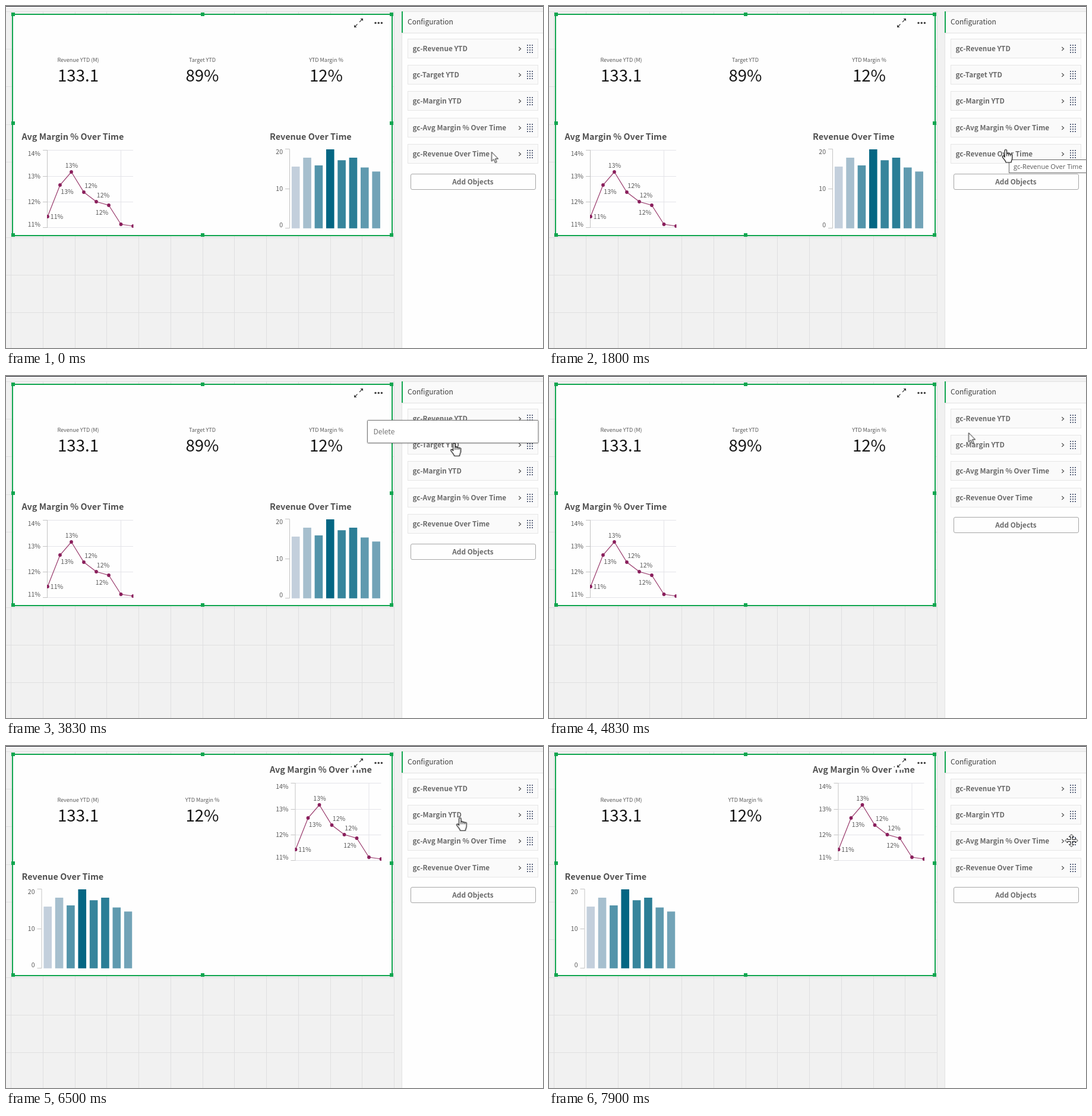
An HTML page for the animation above (8000 ms loop, 904 by 575 pixels).

```html
<!DOCTYPE html>
<html lang="en">
<head>
<meta charset="utf-8">
<title>Dashboard configuration</title>
<style>
html, body { margin: 0; width: 100%; height: 100%; overflow: hidden; background: #f1f1f1; }
svg { display: block; width: 100vw; height: 100vh; }
text { font-family: "Noto Sans CJK JP", "Noto Sans CJK SC", "Noto Sans CJK KR", "Open Sans", sans-serif; fill: #595959; }
.mid { text-anchor: middle; }
.end { text-anchor: end; }
.label { font-size: 9.05px; }
.value { font-size: 27.6px; fill: #151515; }
.title { font-size: 14.45px; font-weight: 600; fill: #505050; }
.axis { font-size: 10.5px; }
.head { font-size: 12px; fill: #404040; }
.item { font-size: 11.82px; font-weight: 600; fill: #6a6a6a; }
.tip { font: 11.1px "Open Sans", "Noto Sans", sans-serif; }
.grid { stroke: #dfdfe0; }
.rule { stroke: #e4e4e9; }
.tick { stroke: #c4c4c4; }
.cur { fill: #fff; stroke: #111; stroke-linejoin: round; }

.anim, #cursor, #tooltip { animation: 8s infinite step-end; }
#listA { animation-name: listA; }
#listB { animation-name: listB; }
#menu { animation-name: menu; }
#hover { animation-name: hover; }
#kpiA { animation-name: kpiA; }
#kpiB, #mask { animation-name: kpiB; }
#line { animation-name: line; }
#bars { animation-name: bars; }
#arrow { animation-name: arrow; }
#hand { animation-name: hand; }
#move { animation-name: move; }
#tooltip { animation-name: tooltip; animation-timing-function: linear; }
#cursor { animation-name: path; animation-timing-function: linear; }

@keyframes listA { 0% { visibility: visible } 59.65%, 100% { visibility: hidden } }
@keyframes listB { 0% { visibility: hidden } 59.65%, 100% { visibility: visible } }
@keyframes menu { 0% { visibility: hidden } 47.8% { visibility: visible } 59.05%, 100% { visibility: hidden } }
@keyframes hover { 0% { fill: #fff } 52.3% { fill: #f0f0f0 } 59.05%, 100% { fill: #fff } }
@keyframes kpiA { 0% { visibility: visible } 73.7%, 100% { visibility: hidden } }
@keyframes kpiB { 0% { visibility: hidden } 73.7%, 100% { visibility: visible } }
@keyframes line { 0% { transform: none } 73.7%, 100% { transform: translate(417.5px, -180px) } }
@keyframes bars {
  0% { transform: none; visibility: visible }
  60.3% { transform: none; visibility: hidden }
  73.7%, 100% { transform: translate(-417.5px, 0); visibility: visible }
}
@keyframes tooltip { 0%, 20% { opacity: 0 } 22.4%, 32% { opacity: 1 } 32.4%, 100% { opacity: 0 } }
@keyframes arrow {
  0% { opacity: 1 } 4.1% { opacity: 0 }
  32.5% { opacity: 1 } 33% { opacity: 0 }
  34.5% { opacity: 1 } 35.1% { opacity: 0 }
  36.6% { opacity: 1 } 37.1% { opacity: 0 }
  52.3% { opacity: 1 } 77% { opacity: 0 }
  94.6% { opacity: 1 } 96.5%, 100% { opacity: 0 }
}
@keyframes hand {
  0% { opacity: 0 } 4.1% { opacity: 1 }
  32.5% { opacity: 0 } 33% { opacity: 1 }
  34.5% { opacity: 0 } 35.1% { opacity: 1 }
  36.6% { opacity: 0 } 37.1% { opacity: 1 }
  52.3% { opacity: 0 } 77% { opacity: 1 }
  85.4%, 100% { opacity: 0 }
}
@keyframes move {
  0% { opacity: 0 } 85.4% { opacity: 1 }
  94.6% { opacity: 0 } 96.5%, 100% { opacity: 1 }
}
@keyframes path {
  0%, 4.1% { transform: translate(817.5px, 245.5px) }
  7.8%, 15.3% { transform: translate(809.5px, 243px); animation-timing-function: ease-in-out }
  19.8%, 32% { transform: translate(769px, 241.5px) }
  37.4% { transform: translate(780.5px, 125.5px); animation-timing-function: ease-out }
  41.2%, 52% { transform: translate(754.5px, 113px); animation-timing-function: ease-out }
  54.9%, 76.25% { transform: translate(706.5px, 95.5px) }
  81.2% { transform: translate(762px, 120.5px) }
  83.7% { transform: translate(858px, 128px); animation-timing-function: ease-out }
  87.4%, 92.4% { transform: translate(881.5px, 118.5px) }
  98.7%, 100% { transform: translate(879.5px, 159px) }
}
</style>
</head>
<body>
<svg viewBox="0 0 904 575" preserveAspectRatio="none">
  <defs>
    <clipPath id="plot"><rect x="69" y="236" width="145.5" height="140"/></clipPath>
    <filter id="shadow" x="-5%" y="-30%" width="110%" height="160%">
      <feDropShadow dx="0" dy="0.5" stdDeviation="1.3" flood-opacity=".25"/>
    </filter>
  </defs>
  <rect width="904" height="575" fill="#f1f1f1"/>
  <g id="sheet" class="grid"></g>

  <rect x="11" y="14" width="639" height="372" fill="#fefefe" stroke="#12a650" stroke-width="2"/>
  <g id="handles" fill="#12a650"></g>

  <g id="kpi"></g>
  <g id="kpiA" class="anim"></g>
  <g id="kpiB" class="anim"></g>
  <g id="line" class="anim"></g>
  <g id="bars" class="anim"></g>

  <rect id="mask" class="anim" x="582" y="18" width="16" height="22" fill="#fefefe"/>
  <g fill="#404040" stroke="#404040">
    <path d="M595 27L599.5 22.5M587 35L591.5 30.5" stroke-width="1.2"/>
    <path d="M596.5 21H601V25.5ZM586 31.5V36H590.5Z" stroke="none"/>
    <g stroke="none"><circle cx="622" cy="28.5" r="1.7"/><circle cx="627.2" cy="28.5" r="1.7"/><circle cx="632.4" cy="28.5" r="1.7"/></g>
  </g>

  <rect x="666" y="9" width="238" height="566" fill="#fefefe"/>
  <path d="M666 9.5H904M666.5 9V575" stroke="#e2e2e2"/>
  <rect x="667" y="10" width="237" height="35" fill="#fafafa"/>
  <path d="M667 45.5H904" stroke="#e2e2e2"/>
  <rect x="666" y="9" width="2" height="36" fill="#12a650"/>
  <text class="head" x="676" y="31">Configuration</text>
  <g id="listA" class="anim"></g>
  <g id="listB" class="anim"></g>
  <rect width="904" height="1" fill="#1c1c22"/>

  <g id="menu" class="anim">
    <rect id="hover" class="anim" x="608.5" y="74.5" width="287.5" height="38" rx="1" stroke="#777" filter="url(#shadow)"/>
    <text class="head" x="618.5" y="98" style="fill:#737373">Delete</text>
  </g>
  <g id="tooltip">
    <rect x="774.5" y="258.5" width="135" height="22" fill="#fff" stroke="#666"/>
    <text class="tip" x="782" y="274">gc-Revenue Over Time</text>
  </g>

  <g id="cursor">
    <path id="arrow" class="anim cur" d="M0 0V15.5L3.6 12.2L6.1 18L8.6 16.9L6.1 11.3H11Z"/>
    <g id="hand" class="anim">
      <path class="cur" stroke-width="1.2" d="M-1.8 12.5V1.7a1.7 1.7 0 0 1 3.4 0V7.5a1.6 1.6 0 0 1 3.2 .6a1.6 1.6 0 0 1 3.1 .7a1.5 1.5 0 0 1 2.9 .9V14.5c0 2.5-1.6 4-1.8 7H.2c-.3-2.6-3-5-5.6-8.6c-1.2-1.9 .9-3.3 2.3-1.9Z"/>
      <path d="M1.6 7.5V11M4.8 8.2V11M7.9 9V11" stroke="#111"/>
    </g>
    <path id="move" class="anim cur" d="M0-10.5L4-6.5H1.5V-1.5H6.5V-4L10.5 0L6.5 4V1.5H1.5V6.5H4L0 10.5L-4 6.5H-1.5V1.5H-6.5V4L-10.5 0L-6.5-4V-1.5H-1.5V-6.5H-4Z"/>
  </g>
</svg>
<script>
const fill = (id, parts) => { document.getElementById(id).innerHTML = parts.flat(9).join(''); };
const text = (cls, x, y, s) => `<text class="${cls}" x="${x}" y="${y}">${s}</text>`;
const path = (cls, d) => `<path class="${cls}" d="${d}" fill="none"/>`;
const rect = (x, y, w, h, attrs = '') => `<rect x="${x}" y="${y}" width="${w}" height="${h}" ${attrs}/>`;
const range = n => [...Array(n).keys()];

fill('sheet', [
  range(13).map(i => path('grid', `M${Math.round(8 + i * 53.75) + .5} 9V575`)),
  range(9).map(i => path('grid', `M0 ${Math.round(8.5 + i * 63.35) + .5}H653`)),
]);

fill('handles', [12, 331, 649].map((x, i) => [14, 197, 385].map((y, j) =>
  i === 1 && j === 1 ? '' : rect(x - 3, y - 3, 6, 6))));

const kpi = (x, name, value) => text('label mid', x, 94, name) + text('value mid', x, 127, value);
fill('kpi', [kpi(121.5, 'Revenue YTD (M)', '133.1')]);
fill('kpiA', [kpi(330.5, 'Target YTD', '89%'), kpi(539, 'YTD Margin %', '12%')]);
fill('kpiB', [kpi(330.5, 'YTD Margin %', '12%')]);

const points = [[70, 354], [91, 301], [110, 279], [131, 313], [152, 329], [173, 335], [193.5, 367], [214, 370]];
const notes = [[85.5, 354, 11], [103, 312, 13], [110.5, 268, 13], [143, 302, 12], [163.5, 318, 12], [161.5, 347, 12]];
fill('line', [
  text('title', 26.5, 225, 'Avg Margin % Over Time'),
  [242.5, 286.5, 329.5, 372.5].map(y => path('rule', `M69 ${y}H214`) + path('tick', `M62 ${y}H69`)),
  path('rule', 'M193.5 242V372'),
  path('tick', 'M69.5 242V373'),
  [248, 286, 329, 367].map((y, i) => text('axis end', 58, y + 4, 14 - i + '%')),
  '<g clip-path="url(#plot)">',
  `<polyline points="${points}" fill="none" stroke="#98386a" stroke-width="1.2"/>`,
  points.map(([x, y]) => `<circle cx="${x}" cy="${y}" r="2.9" fill="#8a1f5c"/>`),
  '</g>',
  notes.map(([x, y, n]) => text('axis mid', x, y + 4, n + '%')),
]);

const tops = [270, 255, 268, 241, 259.3, 255, 271.5, 278.3];
const blues = ['#c3cfdc', '#a6bfce', '#5394aa', '#046683', '#37859c', '#2b7e96', '#5f9aaf', '#72a3b7'];
fill('bars', [
  text('title', 444, 225, 'Revenue Over Time'),
  path('tick', 'M470 240.5H477.5V373.5H470M470 307.5H477'),
  [[20, 245], [10, 307], [0, 368]].map(([n, y]) => text('axis end', 466, y + 4, n)),
  tops.map((y, i) => rect(480.9 + i * 19.35, y, 13.6, 373.8 - y, `fill="${blues[i]}"`)),
]);

const row = (name, i) => {
  const y = Math.round(55 + i * 44.2) + .5;
  return [
    rect(676.5, y, 219, 32, 'fill="#fafafa" stroke="#e6e6e6"'),
    text('item', 684.5, y + 20.5, 'gc-' + name),
    `<path d="M863.3 ${y + 13.5}l3.2 3-3.2 3" fill="none" stroke="#595959" stroke-width="1.3"/>`,
    range(12).map(k => rect(877 + k % 3 * 4, y + 9.5 + (k / 3 | 0) * 4, 2, 2, 'fill="#5d6780"')),
  ];
};
const list = names => {
  const y = Math.round(61 + names.length * 44.1) + .5;
  return [
    names.map(row),
    rect(681.5, y, 210, 26, 'rx="2.5" fill="#fefefe" stroke="#a6a6a6"'),
    text('item mid', 786, y + 17.5, 'Add Objects'),
  ];
};
const names = ['Revenue YTD', 'Target YTD', 'Margin YTD', 'Avg Margin % Over Time', 'Revenue Over Time'];
fill('listA', list(names));
fill('listB', list(names.filter(n => n !== 'Target YTD')));
</script>
</body>
</html>
```
